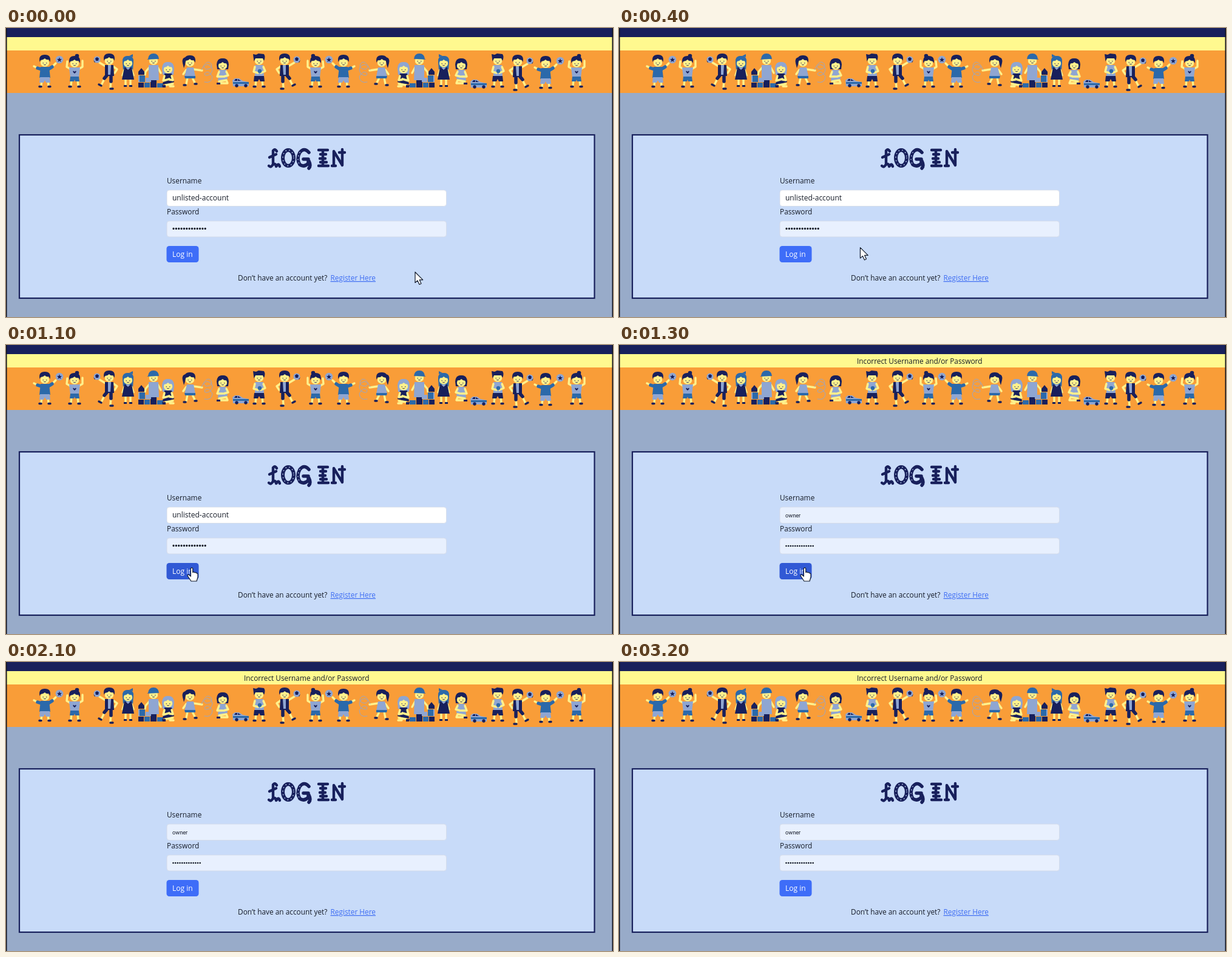
Recreate the animation shown at these times as an HTML page. Size 1000 by 476 pixels, loop 3300 ms.

```html
<!DOCTYPE html>
<html lang="en">
<head>
<meta charset="utf-8">
<title>Log in</title>
<style>
html, body { margin: 0; height: 100%; overflow: hidden; background: #98abc9 }
svg { display: block; width: 100vw; height: 100vh }
text { font: 11.85px "Open Sans", sans-serif; fill: #161c28 }
.n { fill: #18205c } .b { fill: #2b69aa } .g { fill: #8fa6d2 } .s { fill: #fff18c }
.ln, .lb, .lg, .ls { fill: none; stroke-width: 3.4; stroke-linecap: round; stroke-linejoin: round }
.ln { stroke: #18205c } .lb { stroke: #2b69aa } .lg { stroke: #8fa6d2 } .ls { stroke: #fff18c }
.thin { stroke-width: .9 } .wide { stroke-width: 5.5 }
.field { stroke: #d3dae6; stroke-width: .8 }
.dots { fill: none; stroke: #161c28; stroke-linecap: round }
#second text.small { font: 9.2px Roboto, "Liberation Sans", sans-serif }
</style>
</head>
<body>
<svg viewBox="0 0 1000 476" preserveAspectRatio="none">
<defs>
  <g id="face">
    <ellipse class="s" rx="7.200" ry="6.800"/>
    <circle class="n" cx="-2.800" cy=".8" r=".7"/><circle class="n" cx="2.800" cy=".8" r=".7"/>
    <path class="ln thin" d="M-1.500 3.500Q0 4.600 1.500 3.500"/>
  </g>
  <path id="fringe" d="M-8.500 2Q-11-10 0-10Q11-10 8.500 2L6.500-2Q2-1 0-4Q-3-1-7-1Z"/>
  <g id="legs">
    <path class="ls" d="M-5 86L-6 95M5 86L6 95"/>
    <path class="ln" d="M-6 96.500H-9M6 96.500H9"/>
  </g>

  <g id="starboy">
    <use href="#legs"/>
    <path class="ls" d="M-8 68L-18 63M8 68L18 58"/>
    <path class="lb wide" d="M-6 68L-12 66M6 68L12 64"/>
    <path class="b" d="M-7 64H7L9 82H-9Z"/>
    <path class="g" d="M-8 81H8L9 90H2L0 86L-2 90H-9Z"/>
    <use href="#face" y="57"/><use href="#fringe" class="n" y="54"/>
    <circle class="g" cx="24" cy="52" r="6.300"/>
    <path class="n" d="M24 48L25 51H28L25.800 53L26.600 56L24 54.200L21.400 56L22.200 53L20 51H23Z"/>
  </g>

  <g id="cheer">
    <use href="#legs"/>
    <path class="ls" d="M-6 68L-13 64L-12 55M6 68L13 64L13 54"/>
    <path class="g" d="M-9 65H9L7 82H-7Z"/>
    <path class="b" d="M-7 80H7L8 88H1L0 85L-1 88H-8Z"/>
    <path class="n" d="M0 75Q-4 72-2 70.500L0 72L2 70.500Q4 72 0 75Z"/>
    <circle class="n" cx="4" cy="46" r="3.300"/>
    <use href="#face" y="58"/><use href="#fringe" class="n" y="56"/>
  </g>

  <g id="kick">
    <path class="ls" d="M-6 63L-16 57M6 63L13 68L9 74M-8 84L-13 94M3 86L2 98"/>
    <path class="ln wide" d="M-3 77L-8 83M3 77L3 88"/>
    <path class="ln" d="M-13 95L-17 93M2 100H6"/>
    <path class="n" d="M-7 61H7L8 79H-7Z"/>
    <path class="g" d="M-2 61H3L2 77H-2Z"/>
    <use href="#face" y="54"/><use href="#fringe" class="n" y="52"/>
    <circle class="g" cx="-20" cy="52" r="5.500"/>
    <path class="n" d="M-23 50L-20 48L-17 50L-18 54H-22ZM-26 53L-23 56L-24 57Z"/>
  </g>

  <g id="dress">
    <path class="b" d="M-8 70L-9 56Q-9 46 0 46Q9 46 9 56L8 70Z"/>
    <path class="ls" d="M-6 69L-9 78M6 69L9 78M-4 84V94M4 84V94"/>
    <path class="n" d="M-6 65H6L10 85H-10ZM-7 94H-2V97H-7ZM2 94H7V97H2Z"/>
    <path class="g" d="M-4 65H4L0 69Z"/>
    <use href="#face" y="58"/><use href="#fringe" class="b" y="56"/>
    <path class="b" d="M2 46L8 43V48Z"/>
  </g>

  <g id="builder">
    <path class="ls" d="M-7 65L-13 72L-14 77M7 65L12 74"/>
    <path class="g" d="M-8 61H8L9 86H-8Z"/>
    <use href="#face" y="54"/>
    <path class="b" d="M-9 51Q-8 42 0 42Q8 42 9 51L-11 52Z"/>
    <path class="n" d="M-25 77V72L-20 66L-15 72V77ZM-25 90H-16V98H-25ZM-5 86H5V98H-5Z"/>
    <path class="b" d="M-23 78H-14V89H-23ZM-15 90H-6V98H-15ZM6 91H16V98H6Z"/>
    <path class="g" d="M-13 82H-4V89H-13ZM-25 78H-23V89H-25Z"/>
  </g>

  <g id="kneelNavy">
    <path class="g" d="M-9 77L-10 66Q-9 56 0 56Q9 56 10 66L9 77Z"/>
    <path class="n" d="M-6 75H6L10 89L0 92L-9 93Z"/>
    <path class="ls" d="M-6 79L-8 87L2 84M6 79L8 86L2 85M-4 94L8 92M3 96H9"/>
    <path class="n" d="M-10 94H-4V98H-9Z"/>
    <use href="#face" y="68"/><use href="#fringe" class="g" y="66"/>
  </g>

  <g id="dancer">
    <path class="ls" d="M-6 69L-11 76M6 68L20 70M-4 82L-6 92M4 82L8 90"/>
    <path class="n" d="M-6 48Q-14 48-12 58L-10 66Q-8 62-7 55Z"/>
    <path class="g" d="M-5 65H6L9 80H-9Z"/>
    <path class="b" d="M-9 79H9V83H-8Z"/>
    <path class="ln" d="M-7 94H-10M8 92H11"/>
    <use href="#face" y="57"/><use href="#fringe" class="n" y="55"/>
    <path class="lg thin" d="M19 69Q28 50 35 59Q39 67 27 68Q18 63 29 60Q42 64 34 76Q24 81 24 75Q30 68 37 80Q36 92 24 89"/>
  </g>

  <g id="kneelGrey">
    <path class="n" d="M-9 68L-10 60Q-9 50 0 50Q9 50 10 60L9 68Z"/>
    <path class="g" d="M-6 69H6L8 84L-8 87Z"/>
    <path class="ls" d="M-6 72L-9 80L0 80M6 72L9 78L2 80M-6 88L6 86L8 91H-3"/>
    <path class="n" d="M-10 90H-4V93H-10Z"/>
    <use href="#face" y="62"/><use href="#fringe" class="n" y="60"/>
  </g>

  <g id="toyboy">
    <use href="#legs"/>
    <path class="g" d="M-7 61H7L8 80H-7Z"/>
    <path class="ls" d="M-7 64L-9 72L-2 74M7 64L10 71L3 74"/>
    <path class="n" d="M-8 79H8L9 88H2L0 84L-2 88H-9Z"/>
    <circle class="b" cx="1" cy="71" r="3.200"/>
    <use href="#face" y="54"/>
    <path class="n" d="M-8.500 55L-10 43L-5 44L-1 42L8 43Q11 48 8 54L6 50H-6Z"/>
  </g>

  <g id="car">
    <path class="g" d="M-14 86L-10 83H-3L3 87L13 89V96H-13Z"/>
    <path class="n" d="M-11 87L-9 84H-6V87ZM-5 84L0 87H-5Z"/>
    <path class="b" d="M-13 89H13V92H-13Z"/>
    <circle class="n" cx="-7" cy="95" r="2.700"/><circle class="n" cx="8" cy="95" r="2.700"/>
  </g>
</defs>

<path fill="#98abc9" d="M0 0H1000V476H0Z"/>
<path class="n" d="M0 0H1000V15H0Z"/>
<path fill="#fff98f" d="M0 15H1000V37H0Z"/>
<path fill="#f99d38" d="M0 37H1000V107H0Z"/>
<g id="kids"></g>
<path fill="#10131f" d="M0 0H1.500V476H0ZM998.500 0H1000V476H998.500Z"/>
<rect x="22" y="176" width="947.500" height="269" fill="#c8dbf9" stroke="#18205c" stroke-width="2.200"/>

<g class="ln" style="stroke-width:4.400" aria-label="Log in">
  <path d="M446 203Q443 198 440 202V224Q437 231 433 227M434 213L445 208M440 225Q444 222 445 228M446 227Q449 222 451 228"/>
  <ellipse cx="465" cy="214" rx="9" ry="13" stroke-width="6"/>
  <path stroke-width="5.500" d="M499 205Q491 196 484 205Q478 216 484 225Q491 230 498 223V216H490M499 219Q503 227 499 231"/>
  <path d="M515 201H530M522 201V227M515 227H531M518 208H527M517 215H526M518 221H528"/>
  <path d="M540 227V203L554 226V200M549 205H558M537 227H543"/>
  <g stroke="#c8dbf9" stroke-width="1.700" stroke-dasharray="0 6">
    <ellipse cx="465" cy="214" rx="9" ry="13"/>
    <path d="M484 205Q478 216 484 225"/>
  </g>
</g>

<text x="265" y="256">Username</text>
<text x="265" y="306.500">Password</text>
<text x="382" y="416">Don’t have an account yet?</text>
<text x="534.500" y="416" style="fill:#3e6df3;text-decoration:underline">Register Here</text>
<rect id="user" class="field" x="265" y="267" width="460.500" height="26.500" rx="4"/>
<rect class="field" x="265" y="318" width="460.500" height="26" rx="4" fill="#e8f0fe"/>
<rect id="button" x="264.500" y="359" width="53" height="27" rx="4.500"/>
<text x="274" y="376.500" style="fill:#fff;font-size:12px">Log in</text>

<g id="first">
  <text x="274" y="284" style="font-size:12px">unlisted-account</text>
  <path class="dots" stroke-width="3.300" stroke-dasharray="0 4.350" d="M276 330.500H328.500"/>
</g>
<g id="second">
  <text x="392" y="30.500">Incorrect Username and/or Password</text>
  <text class="small" x="274" y="284">owner</text>
  <path class="dots" stroke-width="2.700" stroke-dasharray="0 3.680" d="M275.500 331H320"/>
</g>

<g id="cursor" fill="#fff" stroke="#111a2c" stroke-width="1.200" stroke-linejoin="round">
  <path id="arrow" d="M0 0V17.500L4 14L7 20.500L10 19L7.200 12.800H12.800Z"/>
  <path id="hand" d="M-1.700 1.500Q0-.8 1.700 1.500V8Q3.500 6.500 5 8.500Q7 7.500 8 9.500Q10 9 10 11.500V16L8 22.500H-1L-7 13.500Q-6.500 10.500-4 12.500L-1.700 14.500Z"/>
</g>
</svg>

<script>
const $ = id => document.getElementById(id);
const show = (id, on) => $(id).style.display = on ? "" : "none";

// name, x, flip, vertical offset
const kids = [
  ["starboy", 64, 1], ["cheer", 113, 1], ["kick", 170, 1], ["dress", 201, 1],
  ["builder", 243, 1], ["kneelNavy", 267, 1], ["dancer", 303, 1], ["kneelGrey", 357, 1],
  ["car", 387, 1], ["toyboy", 417, 1], ["kick", 459, -1], ["cheer", 510, -1],
  ["starboy", 556, -1], ["dancer", 619, -1], ["builder", 681, -1], ["kneelNavy", 655, -1],
  ["dress", 721, -1], ["kneelGrey", 750, -1], ["car", 779, 1, 2], ["toyboy", 810, 1],
  ["kick", 843, -1, 2], ["starboy", 889, 1, 2], ["cheer", 940, 1]
];
$("kids").innerHTML = kids.map(([name, x, flip, y = 0]) =>
  `<use href="#${name}" transform="translate(${x} ${y}) scale(${flip} 1)"/>`).join("");

const ease = (t, a, b) => {
  const p = Math.min(1, Math.max(0, (t - a) / (b - a)));
  return p * p * (3 - 2 * p);
};

function draw(now) {
  const t = Math.floor(now % 3300 / 100) * 100;
  const failed = t >= 1300, hover = t >= 600 && t < 1400;
  const come = ease(t, 0, 590), settle = ease(t, 700, 1100), go = ease(t, 1300, 1800);
  const dip = t < 600 ? 17 * Math.sin(Math.PI * t / 600) : 0;
  const x = 674 - 366 * come - 2 * settle + 110 * go;
  const y = 402 - 34 * come - 1.5 * settle + 48 * go - dip;
  $("cursor").setAttribute("transform", `translate(${x} ${y})`);
  show("cursor", t < 2000);
  show("hand", hover);
  show("arrow", !hover);
  show("first", !failed);
  show("second", failed);
  $("user").style.fill = failed ? "#e8f0fe" : "#fff";
  $("button").style.fill = hover ? "#3159d5" : "#3e6df8";
}

const start = performance.now();
function tick() {
  draw(performance.now() - start);
  requestAnimationFrame(tick);
}
tick();
</script>
</body>
</html>
```
